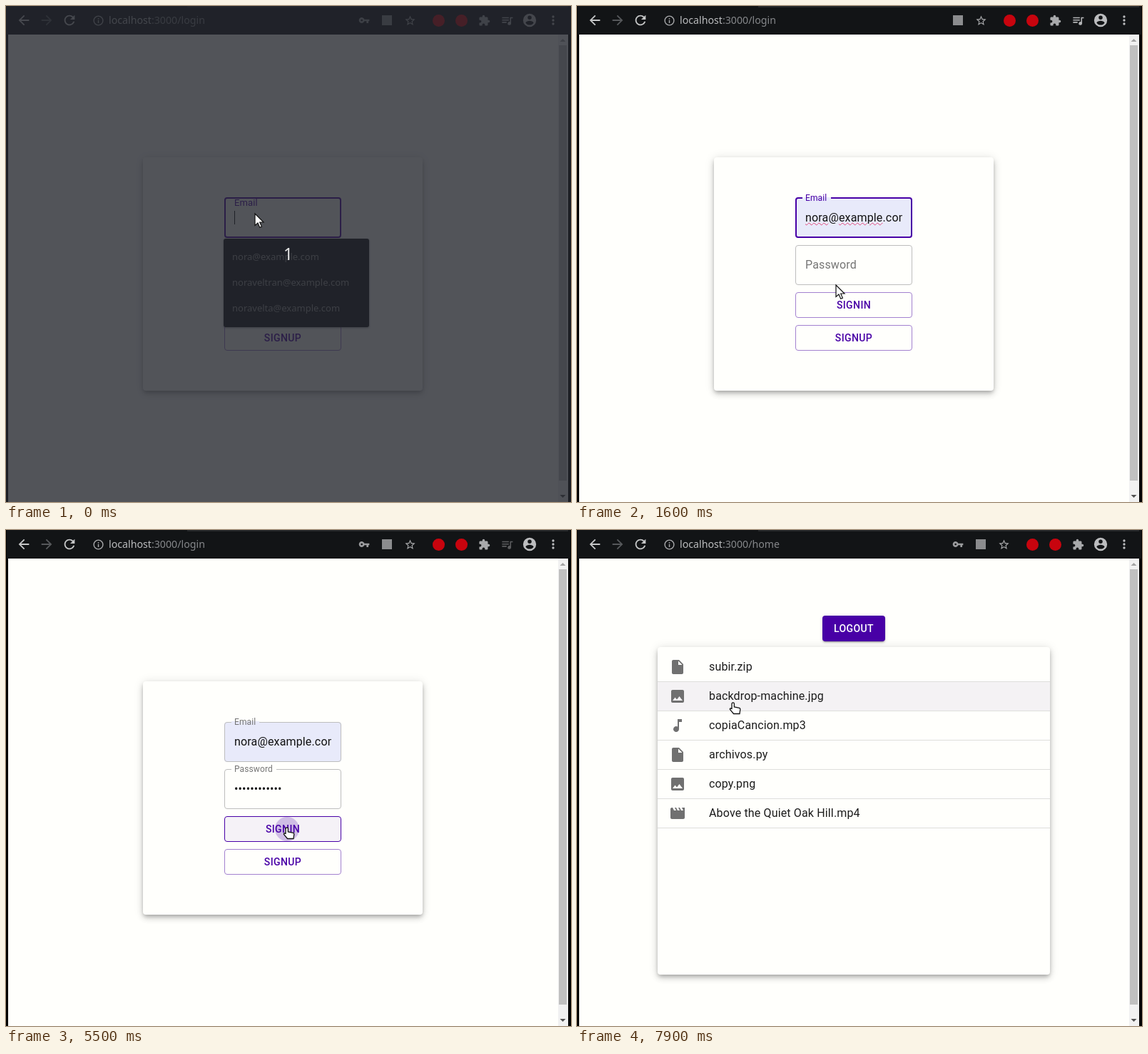
Recreate the animation shown at these times as an HTML page. Size 792 px wide and 695 px high, loop 8000 ms.

```html
<!DOCTYPE html>
<html lang="es">
<head>
<meta charset="utf-8">
<title>Login</title>
<style>
  :root { --main: #4800a6; --page: #fffffc; }
  * { box-sizing: border-box; }
  html, body { margin: 0; width: 100%; height: 100%; overflow: hidden; background: #000; }
  #stage { position: relative; width: 792px; height: 695px; overflow: hidden; background: #000;
    font: 16px/20px Roboto, sans-serif; letter-spacing: .15px; color: #1c1c1c; }
  #stage div, #stage i, #stage svg { position: absolute; }
  #stage div { white-space: pre; }
  .full { inset: 0; }
  .bar { left: 1px; top: 0; width: 790px; height: 40px; background: #121416; }
  .tab { left: 254px; top: 0; width: 534px; height: 2px; background: #26282a; }
  .url { left: 144px; top: 10px; font: 14.2px/20px "Noto Sans", sans-serif; letter-spacing: 0; color: #85878a; }
  .url b { font-weight: 400; color: #bcbdbf; }
  .dot { top: 11.5px; width: 17px; height: 17px; border-radius: 50%; background: #c8040e; }
  .square { left: 527px; top: 13px; width: 14px; height: 14px; background: #8b8c8e; }
  .page { left: 3px; top: 40px; width: 785px; height: 655px; background: var(--page); }
  .track { left: 774px; top: 40px; width: 14px; height: 655px; background: #f1f1f1; }
  .thumb { left: 775px; top: 55px; width: 11px; height: 610px; background: #c0c0c0; }
  .card { background: var(--page); border-radius: 4px;
    box-shadow: 0 3px 5px -1px #0003, 0 5px 8px #00000024, 0 1px 14px #0000001f; }
  .field { left: 306px; width: 164px; height: 56px; border-radius: 4px; background: var(--page); }
  .outline { inset: 0; border: 1px solid #bdbdbd; border-radius: 4px; }
  .gap { left: 10px; top: -1px; height: 3px; background: inherit; }
  .label { left: 14px; top: 18px; color: #757575; transform-origin: 0 50%; }
  .value { left: 14px; top: 18px; width: 136px; height: 22px; overflow: hidden; color: #111; }
  .caret { top: 18px; width: 1px; height: 19px; background: #111; }
  .focused .outline { inset: -1px 0 0; border: 2px solid var(--main); }
  .focused .label { color: var(--main); }
  .filled { background: #e8eafa; }
  .misspelt u { text-decoration: underline wavy #e0457b 1px; text-underline-offset: 1px; }
  u { text-decoration: none; }
  .button { left: 306px; width: 164px; height: 36px; border: 1px solid #a381cf; border-radius: 4px;
    font: 500 14px/34px Roboto, sans-serif; letter-spacing: .4px; text-align: center; color: var(--main); overflow: hidden; }
  .button.hover { background: #f5f2f7; border-color: var(--main); }
  #logout { left: 344px; top: 120px; width: 88px; border: 0; line-height: 36px; color: #fff; background: var(--main);
    overflow: visible; box-shadow: 0 3px 1px -2px #0003, 0 2px 2px #00000024, 0 1px 5px #0000001f; }
  #ripple { border-radius: 50%; background: #4800a638; transform: translate(-50%, -50%); left: 87px; top: 17px; }
  #menu { left: 305px; top: 326px; width: 204px; height: 124px; border-radius: 3px; background: #121416;
    box-shadow: 0 1px 3px #0006; font: 13px/36px "Noto Sans", sans-serif; letter-spacing: 0; color: #999; padding: 7px 12px; }
  .row { left: 113px; width: 550px; height: 41px; border-bottom: 1px solid #dededc; padding-left: 72px; line-height: 39px; }
  .row.hover { background: #f4f2f4; }
  #dim { background: rgba(36, 39, 46, .79); }
  #count { left: 389px; top: 333px; font: 23px/28px "Noto Sans", sans-serif; color: #e6e6e6; }
  #mouse { left: 0; top: 0; width: 1px; height: 1px; overflow: visible; }
</style>
</head>
<body>
<div id="stage">
  <div class="bar"></div><div class="tab"></div>
  <div class="url"><b>localhost</b>:3000/<span id="route"></span></div>
  <div class="full" id="tools"></div>
  <div class="full" id="shifting">
    <div class="square"></div>
    <div class="dot" style="left:597.5px"></div><div class="dot" style="left:629.5px"></div>
  </div>
  <div class="page"></div><div class="track"></div><div class="thumb"></div>
  <svg class="full" width="792" height="695">
    <path d="M776.500 50l4-4 4 4z" fill="#a3a3a3"/><path d="M776.500 685l4 4 4-4z" fill="#505050"/>
  </svg>

  <div class="full" id="login">
    <div class="card" style="left:192px;top:212px;width:392px;height:327px"></div>
    <div class="field" id="email" style="top:269px">
      <i class="outline"></i><i class="gap"></i><div class="label">Email</div>
      <div class="value"><u>nora</u>@<u>example</u>.com</div><i class="caret" style="left:14px"></i>
    </div>
    <div class="field" id="password" style="top:335px">
      <i class="outline"></i><i class="gap"></i><div class="label">Password</div>
      <div class="value"></div><i class="caret"></i>
    </div>
    <div class="button" id="signin" style="top:401px"><i id="ripple"></i>SIGNIN</div>
    <div class="button" id="signup" style="top:447px">SIGNUP</div>
    <div id="menu">nora@example.com
noraveltran@example.com
noravelta@example.com</div>
  </div>

  <div class="full" id="home">
    <div class="card" style="left:113px;top:164px;width:550px;height:459px"></div>
    <div class="button" id="logout">LOGOUT</div>
    <div class="full" id="files"></div>
  </div>

  <div class="full" id="dim"></div><div id="count">1</div>
  <svg id="mouse">
    <path id="arrow" d="M0 0V16.500L4 13l2.700 6.300 2.700-1.200L6.700 12h5.300z" fill="#fff" stroke="#111" stroke-width="1.200"/>
    <g id="beam" fill="none">
      <path d="M-3-6.500h2l1 1 1-1h2M0-5.500V5.500M-3 6.500h2l1-1 1 1h2" stroke="#111" stroke-width="3"/>
      <path d="M-3-6.500h2l1 1 1-1h2M0-5.500V5.500M-3 6.500h2l1-1 1 1h2" stroke="#fff"/>
    </g>
    <path id="hand" d="M-1 1.500Q-1 0 .7 0T2.400 1.500V6L9.500 7.300Q11 7.700 10.800 9.500L10 15.500H1.500L-3.500 9.500Q-4.300 7.300-1 8.300Z"
      fill="#fff" stroke="#111" stroke-width="1.300"/>
  </svg>
</div>
<script>
const $ = id => document.getElementById(id);
const show = (el, on) => { el.style.display = on ? '' : 'none'; };

const glyphs = {
  back: 'M20 11H7.83l5.59-5.59L12 4l-8 8 8 8 1.41-1.41L7.83 13H20z',
  forward: 'M12 4l-1.41 1.41L16.17 11H4v2h12.17l-5.58 5.59L12 20l8-8z',
  reload: 'M17.65 6.35C16.2 4.9 14.21 4 12 4c-4.42 0-8 3.58-8 8s3.580 8 8 8c3.730 0 6.840-2.550 7.730-6h-2.080c-.82 2.330-3.040 4-5.650 4-3.310 0-6-2.690-6-6s2.690-6 6-6c1.660 0 3.140.69 4.220 1.780L13 11h7V4z',
  info: 'M11 7h2v2h-2zM11 11h2v6h-2zM12 2a10 10 0 1 0 0 20a10 10 0 1 0 0-20zM12 4a8 8 0 1 1 0 16a8 8 0 1 1 0-16z',
  key: 'M12.65 10a6 6 0 1 0 0 4H17v4h4v-4h2v-4zM7 10a2 2 0 1 1 0 4a2 2 0 1 1 0-4z',
  star: 'M22 9.240l-7.190-.62L12 2 9.190 8.630 2 9.240l5.460 4.730L5.820 21 12 17.270 18.180 21l-1.630-7.030zM12 15.400l-3.760 2.270 1-4.280-3.320-2.880 4.380-.38L12 6.100l1.710 4.040 4.380.38-3.320 2.880 1 4.280z',
  puzzle: 'M20.500 11H19V7c0-1.100-.9-2-2-2h-4V3.500a2.500 2.500 0 0 0-5 0V5H4c-1.100 0-2 .9-2 2v3.800h1.500a2.700 2.700 0 0 1 0 5.400H2V20c0 1.100.9 2 2 2h3.800v-1.500a2.700 2.700 0 0 1 5.400 0V22H17c1.100 0 2-.9 2-2v-4h1.500a2.500 2.500 0 0 0 0-5z',
  playlist: 'M15 6H3v2h12zM15 10H3v2h12zM3 16h8v-2H3zM17 6v8.180a3 3 0 1 0 2 2.820V8h3V6z',
  account: 'M12 2a10 10 0 1 0 0 20a10 10 0 1 0 0-20zM12 5a3 3 0 1 1 0 6a3 3 0 1 1 0-6zM12 19.200c-2.500 0-4.710-1.280-6-3.220.03-1.990 4-3.080 6-3.080s5.970 1.090 6 3.080c-1.290 1.940-3.500 3.220-6 3.220z',
  more: 'M12 4a2 2 0 1 0 0 4a2 2 0 1 0 0-4zM12 10a2 2 0 1 0 0 4a2 2 0 1 0 0-4zM12 16a2 2 0 1 0 0 4a2 2 0 1 0 0-4z',
  file: 'M6 2c-1.100 0-2 .9-2 2v16c0 1.100.9 2 2 2h12c1.100 0 2-.9 2-2V8l-6-6zM13 9V3.500L18.500 9z',
  image: 'M21 19V5c0-1.100-.9-2-2-2H5c-1.100 0-2 .9-2 2v14c0 1.100.9 2 2 2h14c1.100 0 2-.9 2-2zM8.500 13.500l2.500 3.010L14.500 12l4.500 6H5z',
  music: 'M12 3v10.550A4 4 0 1 0 14 17V7h4V3z',
  movie: 'M18 4l2 4h-3l-2-4h-2l2 4h-3l-2-4H8l2 4H7L5 4H4c-1.100 0-2 .9-2 2v12c0 1.100.9 2 2 2h16c1.100 0 2-.9 2-2V4z'
};

function icon(parent, name, x, y, size, color) {
  parent.insertAdjacentHTML('beforeend',
    `<svg viewBox="0 0 24 24" width="${size}" height="${size}" style="left:${x - size / 2}px;top:${y - size / 2}px">
    <path fill-rule="evenodd" fill="${color}" d="${glyphs[name]}"/></svg>`);
  return parent.lastElementChild;
}

const tools = $('tools'), shifting = $('shifting');
icon(tools, 'back', 25, 20, 22, '#c6c7c8');
icon(tools, 'forward', 57, 20, 22, '#56585b');
icon(tools, 'reload', 89, 20, 22, '#c6c7c8');
icon(tools, 'info', 129, 20, 17, '#a8a9ab');
icon(tools, 'account', 734, 20, 22, '#bcbdbf');
icon(tools, 'more', 767, 20, 20, '#bcbdbf');
const playlist = icon(tools, 'playlist', 702, 20, 19, '#b4b5b7');
const key = icon(shifting, 'key', 502, 20, 16, '#9a9b9d');
icon(shifting, 'star', 566, 20, 17, '#a8a9ab');
icon(shifting, 'puzzle', 670, 20, 17, '#a8a9ab');

const files = [['file', 'subir.zip'], ['image', 'backdrop-machine.jpg'], ['music', 'copiaCancion.mp3'],
  ['file', 'archivos.py'], ['image', 'copy.png'], ['movie', 'Above the Quiet Oak Hill.mp4']];
const rows = files.map(([type, name], i) => {
  const row = document.createElement('div');
  row.className = 'row';
  row.style.top = 172 + 41 * i + 'px';
  row.textContent = name;
  icon(row, type, 28, 20, 24, '#707070');
  $('files').append(row);
  return row;
});

// time, x, y
const path = [[0, 349, 291], [100, 352, 294], [300, 352, 294], [600, 358, 335], [900, 363, 367], [1400, 363, 369],
  [1600, 363, 391], [1800, 364, 460], [2000, 344, 373], [5000, 344, 373], [5200, 368, 400], [5400, 393, 417],
  [6200, 393, 417], [6400, 300, 385], [6600, 225, 350], [6700, 225, 350], [7200, 205, 310], [7600, 216, 246],
  [7800, 216, 246], [7900, 218, 242], [8000, 218, 242]];
const keystrokes = [2900, 3000, 3100, 3200, 3400, 3500, 3800, 3900, 4300, 4400, 4400, 4600];

function mouseAt(t) {
  const i = Math.max(1, path.findIndex(p => p[0] >= t));
  const [t0, x0, y0] = path[i - 1], [t1, x1, y1] = path[i];
  const k = (t - t0) / (t1 - t0);
  return [x0 + (x1 - x0) * k, y0 + (y1 - y0) * k];
}

const within = (y, top, height) => y >= top && y < top + height;

function setField(id, { focused, float, caret, gap, text }) {
  const part = name => $(id).querySelector('.' + name);
  $(id).classList.toggle('focused', focused);
  part('label').style.transform = `translateY(${-28 * float}px) scale(${1 - float / 4})`;
  part('gap').style.width = float > .9 ? gap + 'px' : 0;
  show(part('value'), text);
  show(part('caret'), caret);
}

function draw(now) {
  const t = Math.floor(now % 8000 / 100) * 100;
  const atHome = t >= 5800, [x, y] = mouseAt(t);

  $('route').textContent = atHome ? 'home' : 'login';
  show(key, t < 1400 || t >= 2900);
  playlist.style.opacity = t < 3800 ? 1 : .45;
  show(playlist, t < 6500);
  shifting.style.transform = t < 6500 ? '' : 'translateX(32px)';

  show($('login'), !atHome);
  show($('home'), atHome);
  show($('menu'), t < 1400);
  show($('files'), t >= 5900);

  const onEmail = t < 2000, onPassword = !onEmail && t < 5400;
  const filled = t >= 600;
  const rise = 1 - (1 - Math.min(1, (t + 73) / 200)) ** 3;
  setField('email', { focused: onEmail, float: rise, gap: onEmail ? 40 : 39, text: filled,
    caret: t < 600 || t >= 1100 && t < 1400 });
  $('email').classList.toggle('filled', filled);
  $('email').classList.toggle('misspelt', t >= 1400 && onEmail);

  const typed = keystrokes.filter(k => k <= t).length;
  setField('password', { focused: onPassword, float: onEmail ? 0 : t < 2400 ? .8 : 1, gap: onPassword ? 64 : 63, text: true,
    caret: onPassword && (t < 2500 || t >= 2900 && t < 5100) });
  $('password').querySelector('.value').textContent = '•'.repeat(typed);
  $('password').querySelector('.caret').style.left = 14 + 5.54 * typed + 'px';

  const overSignin = !atHome && t > 1400 && within(y, 401, 36);
  const overSignup = !atHome && t > 1400 && within(y, 447, 36);
  $('signin').classList.toggle('hover', overSignin);
  $('signup').classList.toggle('hover', overSignup);
  const radius = t < 5500 ? 0 : 17 + (t - 5500) * .32;
  $('ripple').style.width = $('ripple').style.height = 2 * radius + 'px';

  // row highlight trails the pointer slightly
  const hoverY = mouseAt(Math.max(0, t - 100))[1];
  rows.forEach((row, i) => row.classList.toggle('hover', t >= 6300 && within(hoverY, 172 + 41 * i, 41)));

  const overField = within(y, 269, 56) && t < 1400 || within(y, 335, 56) && t >= 1900;
  const cursor = t < 100 ? 'arrow'
    : overSignin || overSignup || t >= 6300 ? 'hand'
    : overField && !atHome ? (t < 1400 && y > 325 ? 'arrow' : 'beam') : 'arrow';
  for (const id of ['arrow', 'beam', 'hand']) show($(id), id === cursor);
  $('mouse').style.transform = `translate(${Math.round(x)}px, ${Math.round(y)}px)`;

  show($('dim'), t < 100);
  show($('count'), t < 100);
}

function loop() {
  draw(performance.now());
  requestAnimationFrame(loop);
}
loop();
</script>
</body>
</html>
```
